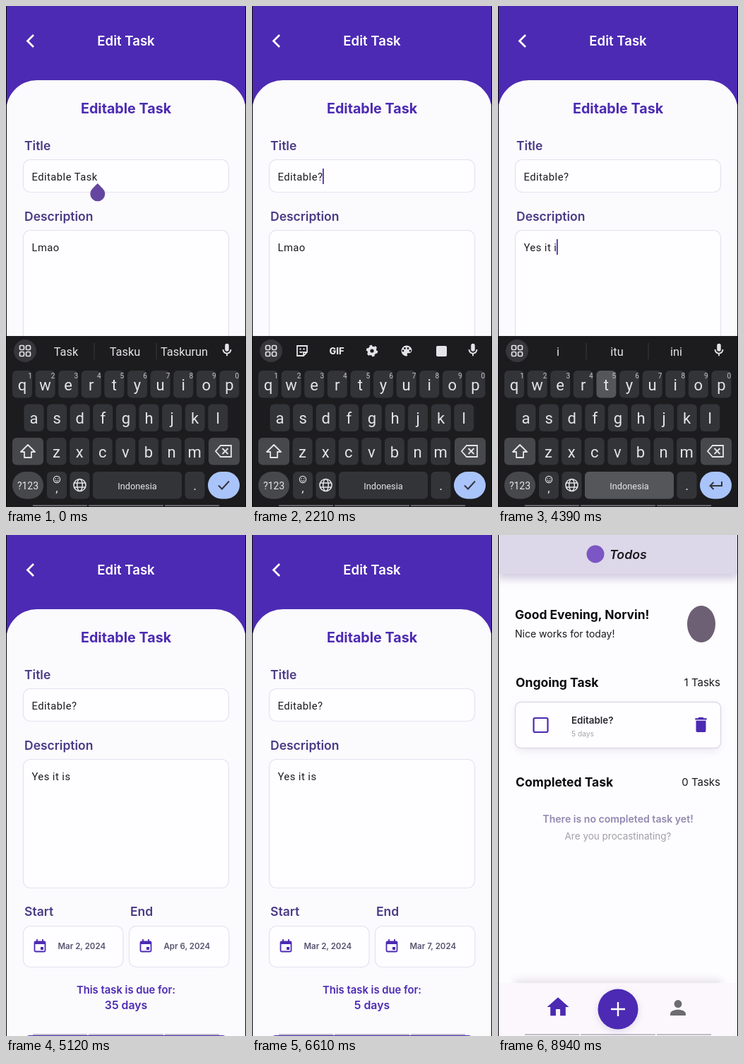
Recreate the animation shown at these times as an HTML page. Size 340 by 709 pixels, loop 8.97 s.

```html
<!DOCTYPE html>
<html lang="en">
<head>
<meta charset="utf-8">
<title>Edit a task</title>
<style>
  html, body { margin: 0; width: 100%; height: 100%; overflow: hidden; background: #fff; }
  svg { display: block; width: 100vw; height: 100vh; }
  text { white-space: pre; }
</style>
</head>
<body>
<svg id="stage" viewBox="0 0 340 709"></svg>
<script>
const LOOP = 8970;
const PURPLE = '#4c2ab3', VIOLET = '#6446a0', PAPER = '#fbfafd', INK = '#1d1b20';
const KEY = '#333438', KEY_ALT = '#47484c', KEY_DOWN = '#55565a', LIGHT = '#e4e4e8';
const INTER = 'Inter, sans-serif', ROBOTO = 'Roboto, sans-serif';
const stage = document.getElementById('stage');

// ---------- drawing helpers ----------
function el(parent, tag, attrs = {}) {
  const node = document.createElementNS('http://www.w3.org/2000/svg', tag);
  set(node, attrs);
  parent.appendChild(node);
  return node;
}
function set(node, attrs) {
  for (const name in attrs) node.setAttribute(name, attrs[name]);
}
const group = (parent, attrs) => el(parent, 'g', attrs);
const rect = (parent, x, y, width, height, fill, rx = 0, more = {}) =>
  el(parent, 'rect', { x, y, width, height, fill, rx, ...more });
const circle = (parent, cx, cy, r, fill, more = {}) => el(parent, 'circle', { cx, cy, r, fill, ...more });
const line = (parent, d, stroke, width = 2, more = {}) =>
  el(parent, 'path', { d, fill: 'none', stroke, 'stroke-width': width, ...more });

// y is the middle of the capitals
function label(parent, str, x, y, size, fill, more = {}) {
  const node = el(parent, 'text', { x, y: y + size * 0.36, 'font-size': size, fill, 'font-family': INTER, ...more });
  node.textContent = str;
  return node;
}
const MID = { 'text-anchor': 'middle' }, END = { 'text-anchor': 'end' };
const BOLD = { 'font-weight': 700 }, SEMI = { 'font-weight': 600 }, RB = { 'font-family': ROBOTO };

function icon(parent, d, cx, cy, size, fill) {
  const k = size / 24;
  return el(parent, 'path', { d, fill, 'fill-rule': 'evenodd',
    transform: `translate(${cx - size / 2} ${cy - size / 2}) scale(${k})` });
}
function clip(id, x, y, width, height) {
  rect(el(stage, 'clipPath', { id }), x, y, width, height);
  return { 'clip-path': `url(#${id})` };
}
const blur = el(stage, 'filter', { id: 'soft', x: '-20%', y: '-60%', width: '140%', height: '220%' });
el(blur, 'feGaussianBlur', { stdDeviation: 6 });
const SOFT = { filter: 'url(#soft)' };

// ---------- home page ----------
const home = group(stage);
rect(home, 0, 0, 340, 709, '#fdfcfe');
rect(home, 0, 10, 340, 52, '#d2cce0', 0, SOFT);
rect(home, 0, -40, 340, 95, '#ddd8e9');
circle(home, 138, 27, 12.5, '#7c56c4');
label(home, 'Todos', 158, 28, 17.8, INK, { ...SEMI, 'font-style': 'italic' });
label(home, 'Good Evening, Norvin!', 24, 113, 17.4, '#0c0b0e', BOLD);
label(home, 'Nice works for today!', 24, 139.5, 14, '#1a191c');
el(home, 'ellipse', { cx: 288, cy: 126, rx: 20, ry: 26, fill: '#6d5f74' });
[['Ongoing Task', '1 Tasks', 209], ['Completed Task', '0 Tasks', 349.5]].forEach(([name, count, y]) => {
  label(home, name, 25, y, 17.5, '#0c0b0e', BOLD);
  label(home, count, 315, y, 15, '#1a191c', END);
});
rect(home, 26, 240, 288, 66, '#ece9f2', 8, SOFT);
rect(home, 24.5, 236.5, 291, 65, '#fefdff', 8, { stroke: '#dedae7', 'stroke-width': 1.4 });
rect(home, 50.5, 259, 20, 20, 'none', 2, { stroke: PURPLE, 'stroke-width': 2.2 });
label(home, 'Editable?', 104, 262, 13.4, '#29272e', SEMI);
label(home, '5 days', 104, 281, 10.2, '#a5a3aa');
icon(home, 'M6 19c0 1.1.9 2 2 2h8c1.1 0 2-.9 2-2V7H6zM19 4h-3.5l-1-1h-5l-1 1H5v2h14z', 287.5, 268.5, 28, PURPLE);
label(home, 'There is no completed task yet!', 170, 402, 14.1, '#9288b0', { ...SEMI, ...MID });
label(home, 'Are you procastinating?', 170, 426, 13.5, '#a19fa6', MID);
rect(home, 24, 630, 292, 20, '#e3dfe8', 0, SOFT);
rect(home, 0, 634, 340, 100, '#fcf7fc');
icon(home, 'M10 20v-6h4v6h5v-8h3L12 3 2 12h3v8z', 85, 668, 37, PURPLE);
circle(home, 170, 674, 27, '#d5cde8', SOFT);
circle(home, 170, 671, 28.5, PURPLE);
line(home, 'M160 671h20M170 661v20', '#fff', 2.4);
icon(home, 'M12 12a4 4 0 1 0 0-8 4 4 0 0 0 0 8zm0 2c-2.7 0-8 1.3-8 4v2h16v-2c0-2.7-5.3-4-8-4z', 255, 669, 38 * 0.86, '#6c6b70');

// ---------- edit page ----------
const edit = group(stage);
rect(edit, 0, 0, 340, 709, PURPLE);
const body = group(group(edit, clip('below-bar', 0, 94, 340, 615)));
rect(body, 0, 105, 340, 800, PAPER, 44);
line(edit, 'M39 41l-8.500 8.500 8.500 8.500', '#fff', 2.8);
label(edit, 'Edit Task', 170, 49, 18.6, '#fff', { ...SEMI, ...MID });
label(body, 'Editable Task', 170, 145, 19.7, PURPLE, { ...BOLD, ...MID });

const box = (x, y, w, h) => rect(body, x, y, w, h, '#fefdff', 10, { stroke: '#e5e2ee', 'stroke-width': 1.2 });
const heading = (str, x, y) => label(body, str, x, y, 17.5, '#4a3a85', SEMI);
const INPUT = { ...RB, 'letter-spacing': 0.45 };
heading('Title', 26, 197.500);
box(24.5, 217.5, 291, 46);
heading('Description', 26, 297.5);
box(24.5, 317.5, 291, 182);
const titleText = label(body, '', 36.5, 242, 14.8, INK, INPUT);
const descText = label(body, '', 36.5, 342, 14.8, INK, INPUT);

function dateField(name, x, labelX) {
  heading(name, labelX, 533);
  box(x, 553.5, 141.5, 58);
  const left = x + 16;
  rect(body, left, 575.5, 15, 14, 'none', 1.5, { stroke: PURPLE, 'stroke-width': 1.8 });
  rect(body, left, 575, 15, 4, PURPLE);
  line(body, `M${left + 3.5} 572v4M${left + 11.5} 572v4`, PURPLE, 1.8);
  rect(body, left + 8.5, 583, 4, 4, PURPLE);
  return label(body, 'Mar 2, 2024', x + 49, 582, 11.5, '#57526f', SEMI);
}
dateField('Start', 24.5, 26);
const endText = dateField('End', 174.5, 176);
const touch = rect(body, 218, 566, 77, 35, '#000', 17, { opacity: 0.1 });
label(body, 'This task is due for:', 170, 644, 14.8, PURPLE, { ...SEMI, ...MID });
const dueText = label(body, '', 170, 665, 15.8, PURPLE, { ...SEMI, ...MID });
rect(body, 24, 708, 292, 47, PURPLE, 10);
label(body, 'Edit Task', 170, 731, 16.5, '#fff', { ...SEMI, ...MID });

const caret = rect(body, 0, 0, 2, 22, '#5c45a8');
const handle = el(body, 'path', { d: 'M0 0l7.400 7.400A10.500 10.500 0 1 1 -7.400 7.400Z', fill: VIOLET });

// ---------- keyboard ----------
const keyboard = group(stage);
rect(keyboard, 0, 467, 340, 242, '#1c1c1e');
circle(keyboard, 27, 488, 16, '#36363b');
for (const x of [19.5, 28.5]) for (const y of [480.5, 489.5])
  rect(keyboard, x, y, 6, 6, 'none', 1.5, { stroke: LIGHT, 'stroke-width': 1.7 });
icon(keyboard, 'M12 14a3 3 0 0 0 3-3V5a3 3 0 0 0-6 0v6a3 3 0 0 0 3 3zM17 11a5 5 0 0 1-10 0H5a7 7 0 0 0 6 6.900V21h2v-3.100A7 7 0 0 0 19 11z', 313, 487, 22, LIGHT);

const bar = group(keyboard);
line(bar, 'M125 477v23M213 477v23', '#3b3b3f', 1);
const words = [85, 168.5, 252.5].map(x => label(bar, '', x, 489, 16.4, LIGHT, { ...RB, ...MID }));

const tools = group(keyboard);
line(tools, 'M64 481h14v9l-5 5h-9zM73 495v-5h5M67.500 489q2 2.500 4 0', LIGHT, 1.8);
circle(tools, 68.5, 485.5, 1.2, LIGHT);
circle(tools, 73.5, 485.5, 1.2, LIGHT);
label(tools, 'GIF', 120, 488, 13, LIGHT, { ...MID, 'font-weight': 800 });
circle(tools, 170, 488, 4.6, 'none', { stroke: LIGHT, 'stroke-width': 4 });
circle(tools, 170, 488, 7, 'none', { stroke: LIGHT, 'stroke-width': 2.4, 'stroke-dasharray': '3.66' });
icon(tools, 'M12 3a9 9 0 0 0 0 18 1.500 1.500 0 0 0 1.100-2.500c-.8-1 0-2.500 1.200-2.500H16a5 5 0 0 0 5-5c0-4.400-4-8-9-8z', 219, 488, 20, LIGHT);
[[214, 488], [216.500, 484.5], [221, 484.5], [224, 488]].forEach(([x, y]) => circle(tools, x, y, 1.4, '#1c1c1e'));
rect(tools, 261, 481, 15, 15, LIGHT, 2);

const keys = {};
function key(id, cx, cy, width, str = '', size = 22, fill = KEY, rx = 6) {
  const face = rect(keyboard, cx - width / 2, cy - 19, width, 38.5, fill, rx);
  const text = label(keyboard, str, cx, cy + 1, size, LIGHT, { ...RB, ...MID });
  keys[id] = { face, text, fill };
}
[['qwertyuiop', 23, 535], ['asdfghjkl', 39.5, 582.5], ['zxcvbnm', 71.500, 630]].forEach(([row, x0, y], r) =>
  [...row].forEach((ch, i) => {
    const x = x0 + 32.6 * i;
    key(ch, x, y, 28, ch);
    if (!r) label(keyboard, (i + 1) % 10, x + 11, y - 12, 10, '#c6c6ca', { ...RB, ...MID });
  }));
key('shift', 31, 630, 44, '', 0, KEY_ALT);
key('back', 309, 630, 44, '', 0, KEY_ALT);
key('sym', 31, 678, 44, '?123', 14, KEY_ALT, 19);
key(',', 72, 678, 28, '', 14, KEY);
key('globe', 104.5, 678, 28);
key(' ', 186, 678, 126, 'Indonesia', 12.8);
key('.', 267.5, 678, 28, '.', 18);
key('enter', 308.5, 678, 45, '', 0, '#a9c4fa', 19.5);
line(keyboard, 'M31 621l10 10h-5v8h-10v-8h-5z', LIGHT, 1.8, { 'stroke-linejoin': 'round' });
line(keyboard, 'M304 622h15v16h-15l-7-8zM306.500 626l8 8M314.500 626l-8 8', LIGHT, 1.8);
circle(keyboard, 72, 670, 4.6, 'none', { stroke: LIGHT, 'stroke-width': 1.2 });
line(keyboard, 'M69.500 671q2.500 3 5 0M70.300 668v1.500M73.700 668v1.500', LIGHT, 1.1);
label(keyboard, ',', 72, 682, 17, LIGHT, { ...RB, ...MID });
circle(keyboard, 104.5, 678, 8.5, 'none', { stroke: LIGHT, 'stroke-width': 1.6 });
el(keyboard, 'ellipse', { cx: 104.5, cy: 678, rx: 3.8, ry: 8.5, fill: 'none', stroke: LIGHT, 'stroke-width': 1.5 });
line(keyboard, 'M97 675h15M97 681h15', LIGHT, 1.5);
const tick = line(keyboard, 'M301 678.500l5 5 10-11', '#34353c', 2);
const enter = line(keyboard, 'M317 673v6h-16M305.500 674l-5 5 5 5', '#34353c', 2);

const popup = group(keyboard);
rect(popup, 54, 572, 232, 78, '#47484c', 10);
rect(popup, 254, 612, 28, 36, '#a9c4fa', 6);
['&%+"-:\'@', ';/()#!,?'].forEach((row, r) => [...row].forEach((ch, i) =>
  label(popup, ch, 72 + 28 * i, 592 + 38 * r, 19, ch === '?' ? '#222' : LIGHT, { ...RB, ...MID })));

// ---------- system bar ----------
[[38, 77], [117, 106], [225, 77]].forEach(([x, w]) => rect(stage, x, 706, w, 2, '#9796a6', 0, { opacity: 0.6 }));

// ---------- date picker ----------
const barrier = rect(stage, 0, 0, 340, 709, '#000');
const picker = group(stage);
rect(picker, 15.5, 114.5, 309, 482, '#ece6f3', 19);
label(picker, 'Select date', 38, 139, 13, '#49454f', { ...RB, 'font-weight': 500 });
const picked = label(picker, '', 38, 194, 30.5, '#3f3b45', RB);
icon(picker, 'M14 9l1 1-9 9H5v-1zM17.700 3l-2.600 2.100 3.800 3.800 2-2c.4-.4.4-1 0-1.400l-2.500-2.300zM14 6.200l-11 11V21h3.800l11-11z', 290, 194, 22, '#49454f');
line(picker, 'M15.500 227h309', '#cbc5d2', 1);
const monthName = label(picker, '', 38, 252, 13, '#75717c', { ...RB, 'font-weight': 500 });
el(picker, 'path', { d: 'M105 249.500h10l-5 5z', fill: '#6a6671' });
line(picker, 'M255.500 247l-5 5 5 5M295.500 247l5 5-5 5', '#56525c', 1.8);
label(picker, 'Cancel', 217.5, 572, 13.2, VIOLET, { ...RB, ...MID, 'font-weight': 500 });
label(picker, 'OK', 287, 572, 13.2, VIOLET, { ...RB, ...MID, 'font-weight': 500 });

const pages = group(picker, clip('pages', 16, 270, 308, 280));
function month(firstCol, days, chosen, today) {
  const page = group(pages), marks = {};
  const put = (str, col, y, fill = INK) => label(page, str, 44 + 42 * col, y, 14.3, fill, { ...RB, ...MID, 'letter-spacing': 0.3 });
  [...'SMTWTFS'].forEach((ch, col) => put(ch, col, 295));
  for (let day = 1; day <= days; day++) {
    const slot = day + firstCol - 1, col = slot % 7, y = 334 + 38.7 * Math.floor(slot / 7);
    if (day === chosen) marks.dot = circle(page, 44 + 42 * col, y, 19.5, VIOLET);
    if (day === today) circle(page, 44 + 42 * col, y, 19, 'none', { stroke: VIOLET, 'stroke-width': 1 });
    const text = put(day, col, y, day === today ? VIOLET : INK);
    if (day === chosen) marks.text = text;
  }
  return { page, ...marks };
}
const april = month(1, 30, 6), march = month(5, 31, 7, 2);
set(april.text, { fill: '#fff' });

rect(stage, 0, 0, 1, 709, '#08060c');
rect(stage, 339, 0, 1, 709, '#08060c');

// ---------- timeline (ms) ----------
const titleSteps = [[-300, 'Editable Task'], [200, 'Editable Tas'], [340, 'Editable Ta'], [480, 'Editable T'],
  [620, 'Editable '], [760, 'Editable'], [1980, 'Editable?']];
const descSteps = [[-300, 'Lmao'], [3250, 'Lma'], [3350, 'Lm'], [3450, 'L'], [3550, ''], [3720, 'Y'], [3810, 'Ye'],
  [3900, 'Yes'], [4000, 'Yes '], [4100, 'Yes i'], [4210, 'Yes it'], [4290, 'Yes it '], [4370, 'Yes it i'], [4460, 'Yes it is']];
const hints = [[0, 'Task|Tasku|Taskurun'], [200, 'Tas|Tasya|Task'], [340, 'Ta|Tapi|Tak'], [480, 'T|Tidak|Terima'], [620, ''],
  [760, 'Editable|Edit|Editing'], [1980, ''], [2700, 'Lmao|LMFAO|Lamongan'], [3250, 'Lma|Lama|Lmao'], [3350, 'Lm|Lmao|Lama'],
  [3450, 'L|Lagi|Lah'], [3550, ''], [3720, 'Y|Ya|Yang'], [3810, 'Ye|Yes|Yeay'], [3900, 'Yes|Yess|Yesterday'], [4000, 'I|it|you'],
  [4100, 'i|itu|ini'], [4210, 'it|itu|its'], [4290, 'is|will|was'], [4370, 'i|itu|ini'], [4460, 'is|isi|ist']];
const FOCUS_DESC = 2700, HIDE_KEYS = 4730, OPEN = 5200, PREV = 5640, PICK = 5940, CLOSE = 6300, SCROLL = 6880, POP = 7425;

const presses = [titleSteps, descSteps].flatMap(steps => steps.slice(1).map(([time, str], i) =>
  [time + 40, str.length < steps[i][1].length ? 'back' : str.slice(-1).toLowerCase().replace('?', '.')]));

const at = (steps, t) => steps.filter(s => s[0] <= t).pop();
const ramp = (t, start, span) => Math.min(1, Math.max(0, (t - start) / span));
const easeOut = u => 1 - (1 - u) ** 2;
const show = (node, on) => set(node, { visibility: on ? 'inherit' : 'hidden' });
const write = (node, str) => { if (node.textContent !== str) node.textContent = str; };

function drawInput(t) {
  const inDesc = t >= FOCUS_DESC;
  const title = at(titleSteps, t), desc = at(descSteps, t);
  write(titleText, title[1]);
  write(descText, desc[1]);
  const field = inDesc ? descText : titleText, top = inDesc ? 331 : 231;
  const x = 36.5 + (field.textContent ? field.getComputedTextLength() : 0);
  const since = t - (inDesc ? Math.max(FOCUS_DESC, desc[0]) : title[0]);
  show(caret, t < HIDE_KEYS + 100 && since % 500 < 250);
  set(caret, { x: x - 0.5, y: top - 1 });
  show(handle, t < titleSteps[1][0] || (inDesc && t < descSteps[1][0]));
  set(handle, { transform: `translate(${x} ${top + 20})` });
}

function drawKeyboard(t) {
  const gone = ramp(t, HIDE_KEYS, 160);
  show(keyboard, gone < 1);
  set(keyboard, { transform: `translate(0 ${245 * gone * gone})` });
  const hint = at(hints, t)[1];
  show(bar, hint);
  show(tools, !hint);
  hint.split('|').forEach((word, i) => {
    write(words[i], word);
    set(words[i], { 'font-size': word.length > 8 ? 15.4 : 16.4 });
  });
  const caps = t >= 3550 && t < 3720;
  const holdDot = t >= 1400 && t < 1980;
  const down = presses.filter(([time]) => t >= time && t < time + 160).map(p => p[1]);
  if (caps) down.push('shift');
  if (holdDot) down.push('.');
  for (const id in keys) {
    const { face, text, fill } = keys[id];
    set(face, { fill: down.includes(id) ? (fill === KEY ? KEY_DOWN : '#66676c') : fill });
    if (/^[a-z]$/.test(id)) write(text, caps ? id.toUpperCase() : id);
  }
  show(popup, holdDot && t >= 1540);
  show(tick, t < FOCUS_DESC);
  show(enter, t >= FOCUS_DESC);
}

function drawPicker(t) {
  const alpha = ramp(t, OPEN, 100) * (1 - ramp(t, CLOSE, 80));
  set(barrier, { opacity: 0.54 * alpha });
  set(picker, { opacity: alpha });
  const slide = 310 * easeOut(ramp(t, PREV, 100));
  set(april.page, { transform: `translate(${slide} 0)` });
  set(march.page, { transform: `translate(${slide - 310} 0)` });
  write(monthName, slide > 155 ? 'March 2024' : 'April 2024');
  const chosen = t >= PICK;
  write(picked, chosen ? 'Thu, Mar 7' : 'Sat, Apr 6');
  show(march.dot, chosen);
  set(march.text, { fill: chosen ? '#fff' : INK });
}

function drawPages(t) {
  const saved = t >= CLOSE;
  write(endText, saved ? 'Mar 7, 2024' : 'Apr 6, 2024');
  write(dueText, saved ? '5 days' : '35 days');
  show(touch, t >= OPEN - 60 && t < PREV);
  set(body, { transform: `translate(0 ${-64.5 * easeOut(ramp(t, SCROLL, 260))})` });
  const p = easeOut(ramp(t, POP, 175));
  const zoom = k => `translate(170 354) scale(${k}) translate(-170 -354)`;
  set(edit, { transform: zoom(1 - 0.1 * p), opacity: 1 - p ** 1.2 });
  set(home, { transform: zoom(1.1 - 0.1 * p) });
  show(home, p > 0);
  show(edit, p < 1);
}

function frame() {
  const t = performance.now() % LOOP;
  drawInput(t);
  drawKeyboard(t);
  drawPicker(t);
  drawPages(t);
  requestAnimationFrame(frame);
}
frame();
</script>
</body>
</html>
```
